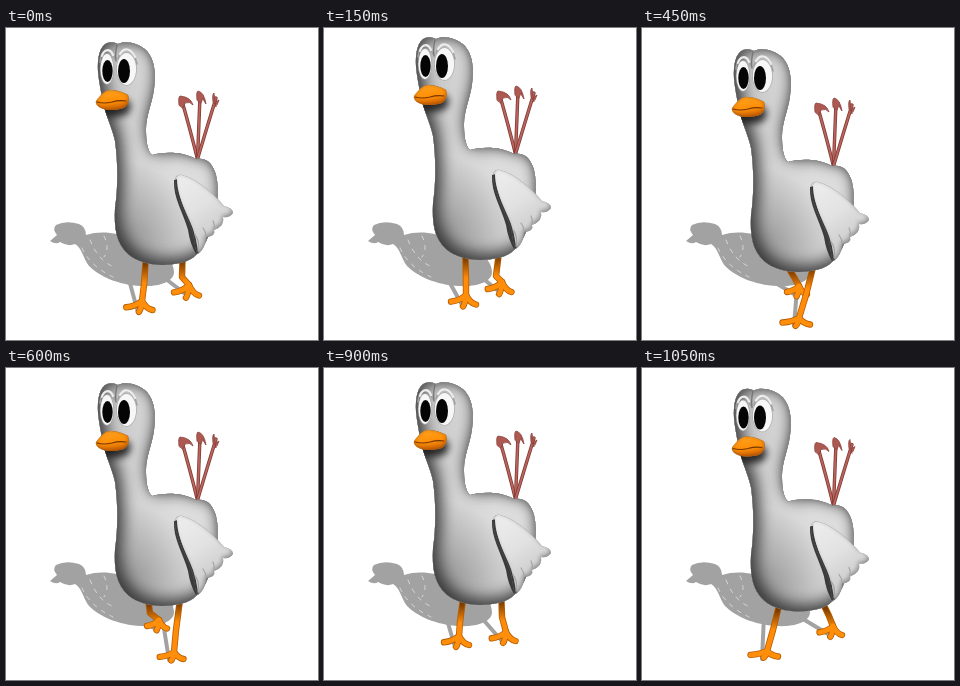
Animation, 312 px wide and 312 px high, one loop 1.2 s. Source, as an HTML page with a canvas:

```html
<!DOCTYPE html>
<html lang="en">
<head>
<meta charset="utf-8">
<title>Walking bird</title>
<style>
html, body { margin: 0; width: 100%; height: 100%; overflow: hidden; background: #fff; }
canvas { display: block; width: 312px; height: 312px; }
</style>
</head>
<body>
<canvas id="stage" width="312" height="312"></canvas>
<script>
const ctx = document.getElementById('stage').getContext('2d');
const STEP = 150;

// Per pose: body bob, then each leg as knee x,y, ankle x,y, toe spread x,y.
const poses = [
  { bob: 0, left: [138, 257, 136, 273, 1.05, 0.9], right: [176, 249, 183, 257, 1, 1.05] },
  { bob: -5, left: [142, 254, 142, 267, 1, 0.95], right: [172, 248, 178, 254, 0.95, 1] },
  { bob: 1, left: [147, 249, 149, 261, 0.9, 0.85], right: [169, 257, 168, 273, 0.95, 1] },
  { bob: 7, left: [152, 249, 157, 258, 0.8, 0.85], right: [164, 267, 157, 290, 1.1, 0.65] },
  { bob: 1, left: [144, 245, 153, 252, 0.8, 0.85], right: [170, 262, 168, 284, 0.95, 0.7] },
  { bob: -5, left: [134, 246, 146, 250, 0.95, 1], right: [176, 259, 176, 276, 0.95, 0.9], blink: true },
  { bob: 0, left: [136, 254, 135, 268, 1, 0.9], right: [178, 249, 182, 264, 0.95, 0.9] },
  { bob: 6.5, left: [131, 262, 125, 283, 1.1, 0.55], right: [187, 248, 191, 258, 0.9, 0.9] }
];

const body = new Path2D(`M92 44 C91 29 94 18 101 15 Q107 13 112 16
  C119 12 133 15 141 23 C149 32 150 47 148 61 C146 76 140 88 140 101
  C140 112 141 122 146 127 C160 123 178 124 190 131 C201 129 207 136 210 147
  C214 164 211 184 205 200 C200 219 190 232 174 235 C155 239 135 237 122 226
  C110 215 108 200 109 180 C112 160 112 135 109 113 C106 99 99 86 97 74
  C95 64 93 54 92 44Z`);

const wing = new Path2D(`M169 151 Q171 146 176 147 C192 151 207 165 218 178
  Q227 180 227 185 Q224 190 217 189 Q219 198 208 202 Q210 208 200 209
  C200 217 196 223 192 226 C189 223 189 215 187 206 C183 190 169 172 169 151Z`);

const wingEdge = new Path2D(`M168 152 C167 170 177 184 182 202 Q184 216 190 226
  L193 223 Q190 211 187 201 C181 185 172 172 172 151Z`);

const beak = new Path2D(`M90 73 C94 68 98 62 105 62 C111 62 119 65 122 67
  C124 74 121 80 114 81 C105 83 97 82 93 79 Q89 76 90 73Z`);

const groundShadow = new Path2D(`M44 213 L51 207 Q46 201 50 197 Q60 192 73 196
  Q80 199 80 207 C95 202 112 205 126 211 C150 216 168 230 168 244
  C168 254 153 259 135 258 C112 257 93 248 83 238 C77 230 76 220 69 216
  Q62 219 54 214 Q50 217 44 213Z`);

function ellipse(x, y, rx, ry, fill) {
  ctx.beginPath();
  ctx.ellipse(x, y, rx, ry, 0, 0, Math.PI * 2);
  ctx.fillStyle = fill;
  ctx.fill();
}

function line(d, color, width) {
  ctx.strokeStyle = color;
  ctx.lineWidth = width;
  ctx.stroke(new Path2D(d));
}

function addStops(gradient, colors) {
  colors.forEach((c, i) => gradient.addColorStop(i / (colors.length - 1), c));
  return gradient;
}

const ramp = (x0, y0, x1, y1, ...colors) =>
  addStops(ctx.createLinearGradient(x0, y0, x1, y1), colors);

const glow = (x, y, r, ...colors) =>
  addStops(ctx.createRadialGradient(x, y, 0, x, y, r), colors);

function castShadow(color, blur, dx, dy) {
  ctx.shadowColor = color;
  ctx.shadowBlur = blur;
  ctx.shadowOffsetX = dx;
  ctx.shadowOffsetY = dy;
}

// Soft shade along the inside of an outline.
function innerShade(path, color, blur, dx, dy) {
  ctx.save();
  ctx.clip(path);
  const outside = new Path2D();
  outside.rect(-100, -100, 520, 520);
  outside.addPath(path);
  castShadow(color, blur, dx, dy);
  ctx.fillStyle = '#777';
  ctx.fill(outside, 'evenodd');
  ctx.restore();
}

function drawGround(pose) {
  ctx.fillStyle = '#a2a2a2';
  ctx.fill(groundShadow);
  for (const [leg, x] of [[pose.left, 122], [pose.right, 156]]) {
    line(`M${x} 248 L${leg[2] - 5} ${leg[3] + 8}`, '#a2a2a2', 4);
  }
  ctx.setLineDash([4, 6]);
  line('M76 220 Q84 238 107 249 M84 212 Q92 232 106 238 M98 208 Q104 220 98 229',
    '#e4e4e4', 0.8);
  ctx.setLineDash([]);
}

function drawLeg(hipX, hipY, [kx, ky, ax, ay, sx, sy]) {
  const shin = `M${hipX} ${hipY} L${kx} ${ky} L${ax} ${ay}`;
  const toe = (x, y) =>
    `M${ax} ${ay} Q${ax + x * sx * 0.4} ${ay + y * sy * 0.85} ${ax + x * sx} ${ay + y * sy}`;
  const toes = toe(-15, 7) + toe(-3, 12) + toe(10, 10);
  const shade = ramp(0, hipY + 5, 0, hipY + 24, '#7a3c00', '#ff8b08');
  line(shin, '#b65c00', 6.4);
  line(toes, '#b65c00', 6.4);
  line(shin, shade, 4.8);
  line(toes, '#ff8e0a', 4.8);
}

function drawTail() {
  // Each feather: tip, then the barb that hooks back from it.
  const feathers = [[174, 68, 187, 77], [192, 63, 200, 76], [208, 65, 210, 79]];
  for (const [x, y, bx, by] of feathers) {
    const stem = `M191.5 131 Q${(x + 191.5) / 2 + 1} 100 ${x + 2} ${y + 5}`;
    line(stem, '#803a35', 3.4);
    line(stem, '#b9655d', 1.8);
    const hook = new Path2D(`M${x - 1} ${y + 9} Q${x - 2} ${y + 1} ${x} ${y}
      Q${bx - 2} ${y + 1} ${bx} ${by} Q${bx - 3} ${by - 4} ${x + 5} ${y + 7}
      L${x + 3} ${y + 12}Z`);
    ctx.fillStyle = '#ad5951';
    ctx.fill(hook);
    ctx.strokeStyle = '#8c423c';
    ctx.lineWidth = 0.8;
    ctx.stroke(hook);
  }
}

function drawBody() {
  ctx.fillStyle = ramp(92, 0, 170, 0, '#bdbdbd', '#d2d2d2', '#dcdcdc');
  ctx.fill(body);
  ctx.fillStyle = glow(106, 226, 95, 'rgba(40,40,40,.5)', 'rgba(40,40,40,.22)', 'rgba(40,40,40,0)');
  ctx.fill(body);
  innerShade(body, 'rgba(45,45,45,.7)', 16, 5, -1);
  innerShade(body, 'rgba(40,40,40,.65)', 16, 1, -6);
  innerShade(body, 'rgba(90,90,90,.3)', 5, -1, 0);
}

function drawWing() {
  ctx.fillStyle = '#3b3b3b';
  ctx.fill(wingEdge);
  ctx.save();
  ctx.translate(2, 0);
  ctx.clip(wing);
  ctx.translate(-2, 0);
  ctx.fillStyle = ramp(175, 155, 207, 205, '#ebebeb', '#e2e2e2', '#cecece');
  ctx.fill(wing);
  ctx.restore();
  innerShade(wing, 'rgba(60,60,60,.45)', 4, -1, -2);
  line('M189 207 Q194 212 192 223 M197 200 Q200 204 200 208 M207 193 Q209 197 208 201',
    '#a4a4a4', 1.2);
}

function drawEyes(closed) {
  line('M94 34 C95 21 104 18 109 31 M112 31 C115 17 127 18 131 36', '#a0a0a0', 1.6);
  line('M96 28 C98 21 104 20 107 27 M114 26 C118 19 125 20 129 29', '#ededed', 2.2);
  line('M111 17 Q109 24 110 33', '#757575', 1.3);
  const eyes = [[101, 41, 6.4, 15], [120.5, 41, 9.6, 16]];
  for (const [x, y, rx, ry] of eyes) {
    ellipse(x, y, rx + 0.7, ry + 0.7, closed ? '#858585' : '#aaa');
    ellipse(x, y, rx, ry, closed ? ramp(x - rx, 0, x + rx, 0, '#b0b0b0', '#cdcdcd', '#b0b0b0') : '#f7f7f7');
    if (closed) line(`M${x - rx} ${y + 7} Q${x} ${y + 18} ${x + rx} ${y + 7}`, '#777', 1.2);
  }
  if (closed) return;
  ellipse(101.5, 43, 5.2, 11, '#050505');
  ellipse(118, 43, 6, 12, '#050505');
}

function drawBeak() {
  ctx.save();
  ctx.clip(body);
  castShadow('rgba(20,20,20,.85)', 7, 2, 7);
  ctx.fillStyle = '#c86400';
  ctx.fill(beak);
  ctx.restore();
  ctx.fillStyle = ramp(105, 62, 109, 84, '#ffa01c', '#ff8f08', '#c25a00');
  ctx.fill(beak);
  innerShade(beak, 'rgba(130,50,0,.55)', 4, 0, -1);
  line('M91 74 Q98 76 106 74 Q113 72 120 73', '#753600', 1.1);
}

function draw(pose) {
  ctx.fillStyle = '#fff';
  ctx.fillRect(0, 0, 312, 312);
  ctx.lineCap = ctx.lineJoin = 'round';
  drawGround(pose);
  const hip = (x, leg) => x + (leg[0] - x) * 0.4;
  drawLeg(hip(141, pose.left), 231 + pose.bob, pose.left);
  drawLeg(hip(177, pose.right), 229 + pose.bob, pose.right);
  ctx.save();
  ctx.translate(0, pose.bob);
  drawTail();
  drawBody();
  drawWing();
  drawEyes(pose.blink);
  drawBeak();
  ctx.restore();
}

const start = performance.now();
let shown = -1;

function tick() {
  const index = Math.floor((performance.now() - start) / STEP) % poses.length;
  if (index !== shown) {
    shown = index;
    draw(poses[index]);
  }
  requestAnimationFrame(tick);
}
tick();
</script>
</body>
</html>
```
